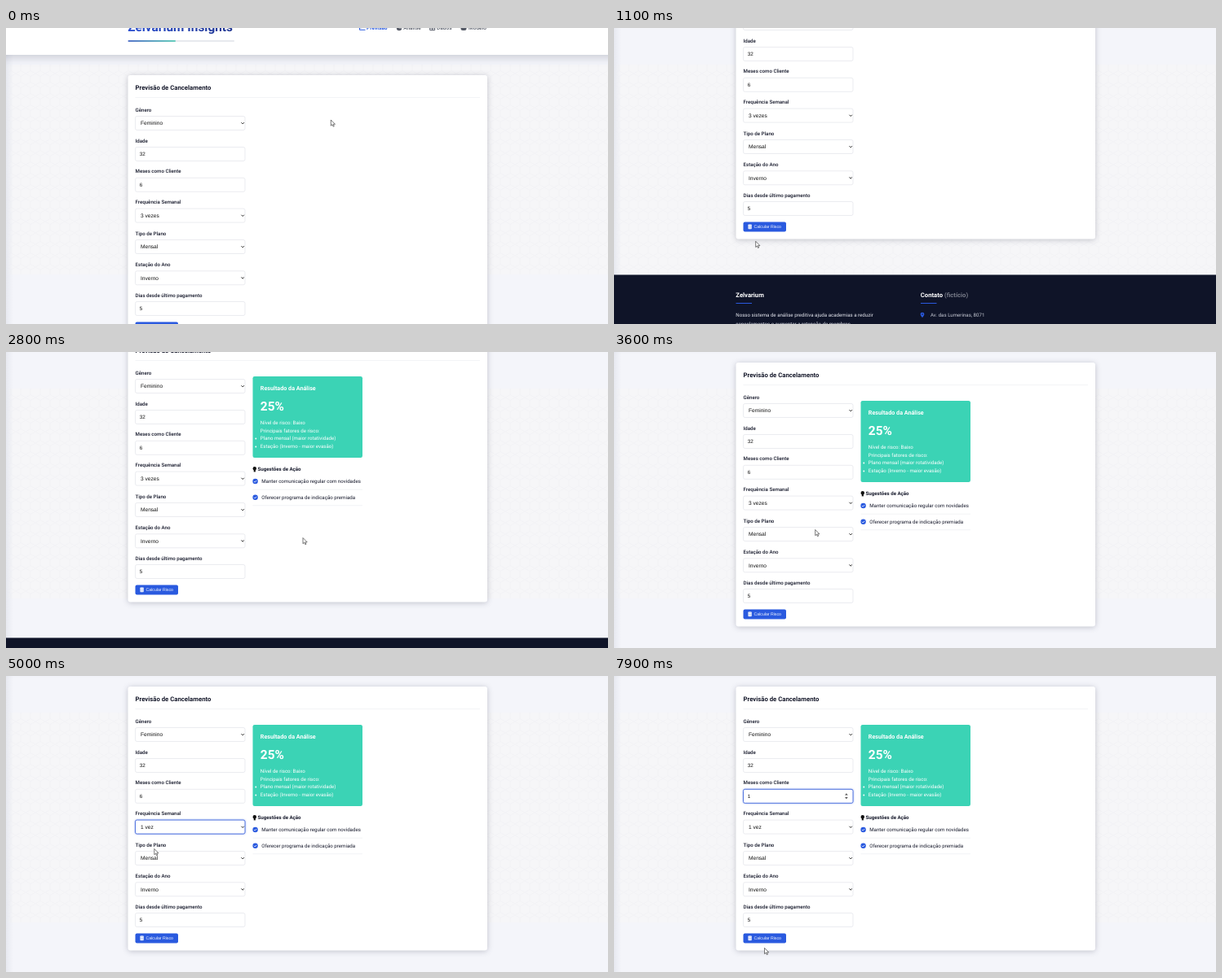
Write an HTML page that moves like this. It is 738 by 364 pixels and loops after 8000 ms.

```html
<!DOCTYPE html>
<html lang="pt-BR">
<head>
<meta charset="utf-8">
<title>Previsão de Cancelamento</title>
<style>
  html, body { margin: 0; width: 100%; height: 100%; overflow: hidden; background: #f4f5fa; }
  svg { display: block; width: 738px; height: 364px; }
  text { font-family: Roboto, sans-serif; white-space: pre; text-rendering: geometricPrecision; }
  .ui { font-family: "Liberation Sans", Arial, sans-serif; }
  .panel { fill: #fff; filter: drop-shadow(0 1.5px 3.5px rgba(25, 30, 60, .24)); }
  .field { fill: #fff; stroke: #e2e4ea; stroke-width: .7; }
  .focus { stroke: #4268dc; stroke-width: .9; filter: drop-shadow(0 0 .8px rgba(60, 100, 225, .5)); }
  .rule { stroke: #eeeff3; stroke-width: .7; }
</style>
</head>
<body>
<svg id="stage" viewBox="0 0 738 364" xmlns="http://www.w3.org/2000/svg"></svg>
<script>
const LOOP = 8000, STEP = 100;
const BLUE = '#2a5adf', INK = '#171a2c', GREEN = '#3bd3b5';
const LEFT = 158.5, WIDE = 134.5;

const text = (x, mid, str, size = 6.15, weight = 400, fill = INK, extra = '') =>
  `<text x="${x}" y="${mid + size * .35}" font-size="${size}" font-weight="${weight}" fill="${fill}" ${extra}>${str}</text>`;
const rect = (x, y, w, h, r, attrs) =>
  `<rect x="${x}" y="${y}" width="${w}" height="${h}" rx="${r}" ${attrs}/>`;
const rule = (x1, x2, y) => `<path class="rule" d="M${x1} ${y}H${x2}"/>`;

const fields = [
  { label: 'Gênero', y: 72, value: 'Feminino', select: true },
  { label: 'Idade', y: 110, value: '32' },
  { label: 'Meses como Cliente', y: 147.8, value: '6', id: 'months' },
  { label: 'Frequência Semanal', y: 185.6, value: '3 vezes', select: true, id: 'freq' },
  { label: 'Tipo de Plano', y: 224, value: 'Mensal', select: true },
  { label: 'Estação do Ano', y: 262.3, value: 'Inverno', select: true },
  { label: 'Dias desde último pagamento', y: 300, value: '5', id: 'days' }
];

function field({ label, y, value, select, id }) {
  const arrow = select
    ? `<path d="M288.5 ${y - .8}l1.7 1.7 1.7-1.7" fill="none" stroke="#111" stroke-width=".9"/>`
    : `<path ${id ? `id="${id}Spin"` : ''} visibility="hidden" fill="#555" d="M283 ${y - 1.2}h3.8l-1.9-2.3zM283 ${y + 1.2}h3.8l-1.9 2.3z"/>`;
  return text(LEFT, y - 16.5, label, 6.15, 500) +
    rect(LEFT, y - 8.5, WIDE, 17, 2, `class="field" ${id ? `id="${id}Box"` : ''}`) +
    text(select ? 165 : 163.7, y, value, select ? 6.6 : 6.3, 400, '#111', `class="ui" ${id ? `id="${id}Text"` : ''}`) +
    arrow;
}

const header = () =>
  rect(-20, -90, 778, 78, 0, 'class="panel" style="filter:drop-shadow(0 3px 6px rgba(25,30,60,.2))"') +
  text(149.3, -46, 'Zelvarium Insights', 15.4, 700, 'url(#brand)') +
  rect(149.5, -29.8, 130.5, 1.6, .8, 'fill="#dfe2e9"') +
  rect(149.5, -29.8, 58.5, 1.6, .8, 'fill="url(#bar)"') +
  `<path d="M433.5-48v5.3h7M435-44.5l2-2 1.3 1 2-2.4" fill="none" stroke="${BLUE}"/>` +
  '<circle cx="482" cy="-45" r="3.2" fill="#555a66"/><path d="M482-45v-3.4M482-45h3.3" stroke="#fff" stroke-width=".6"/>' +
  '<path d="M519.7-47.6h6v5.2h-6zM519.7-45h6M522.7-47.6v5.2" fill="none" stroke="#555a66"/>' +
  rect(557.5, -48, 7, 6, 2.5, 'fill="#555a66"') +
  text(442, -45, 'Previsão', 6.5, 600, BLUE) +
  [[487.3, 'Análise'], [528, 'Dados'], [567, 'Modelo']]
    .map(([x, s]) => text(x, -45, s, 6.5, 500, '#555a66')).join('');

const result = () => {
  const tick = y => `<circle cx="305.6" cy="${y}" r="3.2" fill="${BLUE}"/>` +
    `<path d="M304.1 ${y}l1.1 1.2 2-2.2" fill="none" stroke="#fff" stroke-width=".8"/>`;
  const dot = y => `<circle cx="306.3" cy="${y}" r=".95" fill="#fff"/>`;
  return rect(302.5, 60, 134.5, 100, 2.3, `fill="${GREEN}"`) +
    text(311.8, 74.5, 'Resultado da Análise', 7.2, 700, '#fff') +
    text(311.8, 96.5, '25%', 15.4, 700, '#fff') +
    text(311.8, 116.5, 'Nível de risco: Baixo', 6.15, 400, '#fff') +
    text(311.8, 126.5, 'Principais fatores de risco:', 6.15, 400, '#fff') +
    dot(136.5) + text(311.8, 136.3, 'Plano mensal (maior rotatividade)', 6.15, 400, '#fff') +
    dot(146.5) + text(311.8, 146.2, 'Estação (Inverno - maior evasão)', 6.15, 400, '#fff') +
    '<circle cx="304.8" cy="173.2" r="2.2" fill="#111"/><path d="M303.7 175h2.2v2.4h-2.2z" fill="#111"/>' +
    text(308.5, 174.3, 'Sugestões de Ação', 6.15, 700) +
    tick(189) + text(313.2, 189, 'Manter comunicação regular com novidades') +
    rule(302.5, 437, 199.2) +
    tick(208.8) + text(313.2, 208.8, 'Oferecer programa de indicação premiada') +
    rule(302.5, 437, 218.7);
};

const footer = () =>
  rect(0, 381.5, 738, 120, 0, 'fill="#0f1428"') +
  text(149.3, 406.3, 'Zelvarium', 7.7, 700, '#fff') +
  text(375.8, 406.3, 'Contato <tspan fill="#777b88">(fictício)</tspan>', 7.7, 700, '#fff') +
  rect(149.5, 416, 19.5, 1, 0, `fill="${BLUE}"`) + rect(376, 416, 19.5, 1, 0, `fill="${BLUE}"`) +
  text(149.3, 431, 'Nosso sistema de análise preditiva ajuda academias a reduzir', 6.15, 400, '#e4e6ee') +
  text(149.3, 441.5, 'cancelamentos e aumentar a retenção de membros.', 6.15, 400, '#e4e6ee') +
  `<path d="M378 434.3q-2.4-2.6-2.4-4.2a2.4 2.4 0 0 1 4.8 0q0 1.6-2.4 4.2z" fill="${BLUE}"/>` +
  '<circle cx="378" cy="430" r=".8" fill="#0f1428"/>' +
  text(388, 431, 'Av. das Lumerinas, 8071', 6.15, 400, '#c6c9d3');

const button = () =>
  rect(LEFT, 316.5, 52.5, 12, 2, `id="button" fill="${BLUE}"`) +
  rect(164.5, 319.6, 4.2, 5.6, .6, 'fill="#fff"') +
  `<path d="M165.2 320.8h2.8M165.2 322.6h2.8M165.2 324h2.8" stroke="${BLUE}" stroke-width=".5" opacity=".6"/>` +
  text(171.5, 322.5, 'Calcular Risco', 5.2, 500, '#fff', 'class="ui"');

const menu = () =>
  rect(LEFT, 194.5, WIDE, 89, 0, 'fill="#fff" stroke="#8a8d96" stroke-width=".5"') +
  rect(LEFT + .3, 195, WIDE - .6, 12.5, 0, 'id="pick" fill="#1967d2"') +
  Array.from({ length: 7 }, (_, i) =>
    text(165, 201.2 + i * 12.5, i ? `${i + 1} vezes` : '1 vez', 6.6, 400, '#111', 'class="ui option"')).join('');

document.getElementById('stage').innerHTML = `
  <defs>
    <linearGradient id="brand"><stop stop-color="#2b4fd0"/><stop offset="1" stop-color="#1f3590"/></linearGradient>
    <linearGradient id="bar"><stop stop-color="#2750bd"/><stop offset="1" stop-color="#3bc4ac"/></linearGradient>
    <linearGradient id="edge"><stop stop-color="#e7e9f0"/><stop offset="1" stop-color="#e7e9f0" stop-opacity="0"/></linearGradient>
    <pattern id="weave" width="12" height="14" patternUnits="userSpaceOnUse">
      <path d="M0 0l6 3.5 6-3.5M6 3.5v7M0 14l6-3.5 6 3.5" fill="none" stroke="#f1f1f4" stroke-width=".7"/>
    </pattern>
  </defs>
  <rect width="738" height="364" fill="#f4f5fa"/>
  <rect y="45" width="738" height="258" fill="#f6f6f8"/>
  <rect y="45" width="738" height="258" fill="url(#weave)"/>
  <rect width="9" height="364" fill="url(#edge)"/>
  <g id="page">
    ${header()}
    ${rect(149.5, 13, 440.5, 324.5, 3, 'class="panel"')}
    ${text(158.4, 28.3, 'Previsão de Cancelamento', 7.75, 700)}
    ${rule(158.5, 581, 40.5)}
    ${fields.map(field).join('')}
    ${button()}
    <path id="caret" d="M167.5 144.5v6.6" stroke="#111" stroke-width=".6"/>
    <g id="result">${result()}</g>
    ${footer()}
    <g id="menu">${menu()}</g>
  </g>
  <g id="cursor">
    <path id="arrow" d="M0 0v7.2l1.7-1.5 1.1 2.5 1.2-.5-1.1-2.4h2.3z" fill="#fff" stroke="#222" stroke-width=".6"/>
    <path id="beam" d="M-1.3 0h2.6M0 0v7M-1.3 7h2.6" fill="none" stroke="#222" stroke-width=".7"/>
  </g>`;

const el = id => document.getElementById(id);
const show = (id, on) => el(id).setAttribute('visibility', on ? 'visible' : 'hidden');
const within = (t, a, b) => t >= a && t < b;

const scrollKeys = [[0, 45], [100, 30], [500, -49], [700, -72], [800, -78], [2500, -78], [2800, -30], [3000, -5], [3100, 0]];
const mouseKeys = [
  [0, 398.3, 113], [800, 398.3, 113], [900, 215, 221], [1000, 188, 250], [1100, 173.7, 262.3],
  [1200, 173.7, 262.3], [1700, 183, 244], [2000, 183, 244], [2400, 364, 228.5], [3200, 364, 228.5],
  [3300, 351, 227.3], [3400, 351, 227.3], [3600, 246.7, 218.5], [4000, 218, 186], [4300, 205, 188],
  [4600, 186, 200], [4800, 184, 201], [5000, 181.8, 212.5], [5200, 181, 212], [5800, 187, 143],
  [7200, 187, 143], [7300, 187, 154], [7500, 187, 154], [7900, 184.5, 334.5]
];

// Linear interpolation through rows of [time, ...values]
function sample(keys, t) {
  const i = keys.findIndex(k => k[0] > t);
  if (i < 0) return keys[keys.length - 1].slice(1);
  const a = keys[i - 1], b = keys[i], p = (t - a[0]) / (b[0] - a[0]);
  return a.slice(1).map((v, n) => v + (b[n + 1] - v) * p);
}

function draw(t) {
  const [scroll] = sample(scrollKeys, t);
  const [x, y] = sample(mouseKeys, t);
  const over = (mid, half = 8.5, right = 293) =>
    x > LEFT && x < right && Math.abs(y - scroll - mid) < half;

  el('page').setAttribute('transform', `translate(0 ${scroll})`);
  el('cursor').setAttribute('transform', `translate(${x} ${y})`);

  const open = within(t, 4100, 4800);
  const typing = !open && fields.some(f => !f.select && over(f.y, 6));
  show('arrow', !typing);
  show('beam', typing);

  const monthsFocus = t >= 6000;
  el('freqBox').classList.toggle('focus', within(t, 4100, 6000));
  el('monthsBox').classList.toggle('focus', monthsFocus);
  show('monthsSpin', monthsFocus || over(147.8));
  show('daysSpin', over(300));
  el('button').setAttribute('fill', over(322.5, 6, 211) ? '#2450cb' : BLUE);

  el('freqText').textContent = t < 4800 ? '3 vezes' : '1 vez';
  el('monthsText').textContent = t < 6500 ? '6' : t < 6900 ? '' : '1';
  show('caret', within(t, 6000, 6300) || within(t, 7000, 7600));
  el('result').setAttribute('opacity', Math.min(1, Math.max(0, (t - 1900) / 300)));

  show('menu', open);
  const pick = t < 4400 ? 2 : t < 4500 ? 1 : 0;
  el('pick').setAttribute('y', 195 + pick * 12.5);
  document.querySelectorAll('.option').forEach((o, i) => o.setAttribute('fill', i === pick ? '#fff' : '#111'));
}

function tick() {
  draw(Math.floor(performance.now() % LOOP / STEP) * STEP);
  requestAnimationFrame(tick);
}
tick();
</script>
</body>
</html>
```
